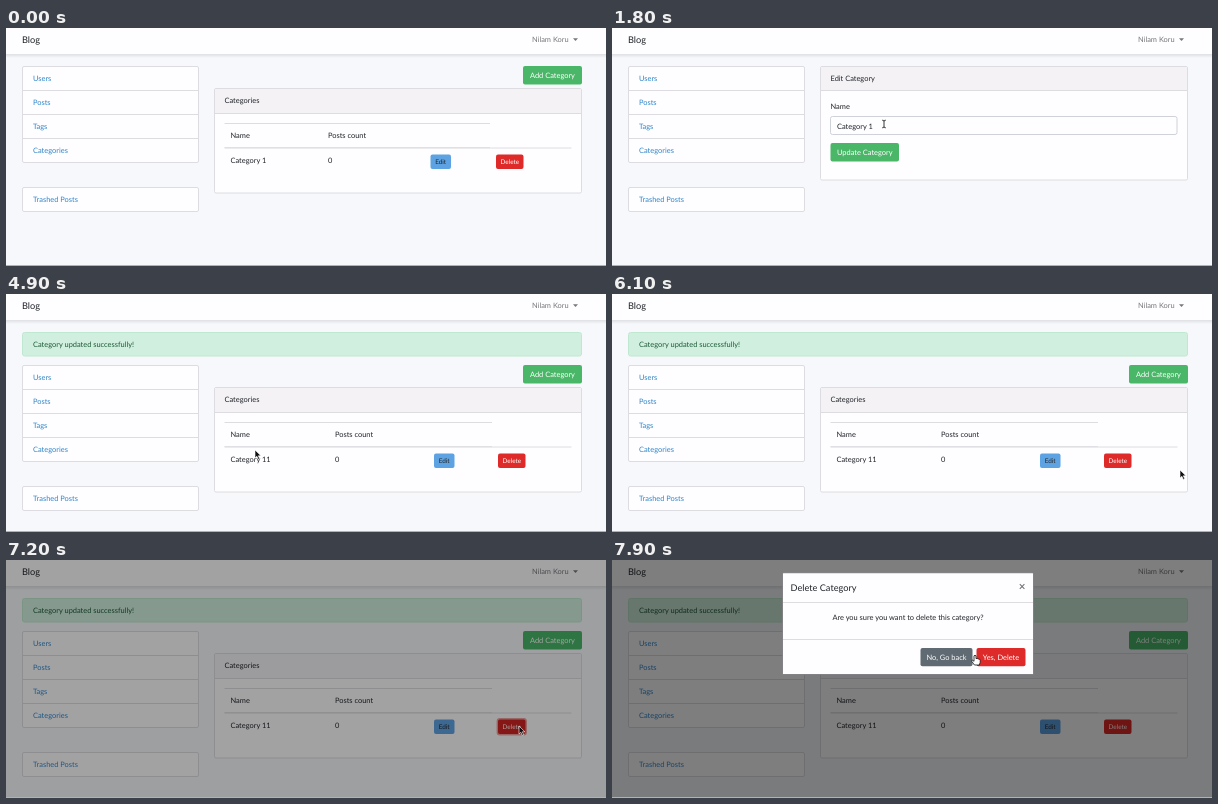
An HTML page that plays this animation: 600 by 238 pixels, repeating every 8000 ms.

```html
<!DOCTYPE html>
<html lang="en">
<head>
<meta charset="utf-8">
<title>Blog categories</title>
<style>
html, body { margin: 0; height: 100%; overflow: hidden; background: #f6f8fb; }
svg { display: block; width: 100vw; height: 100vh; font: 7.45px Lato, "Open Sans", sans-serif; text-rendering: geometricPrecision; }
text { fill: #212529; white-space: pre; }
.link { fill: #2f86c9; }
.light { fill: #fff; }
.muted { fill: #77777a; }
.title { font-size: 9.2px; }
.small { font-size: 6.4px; text-anchor: middle; }
.mid { text-anchor: middle; }
.panel { fill: #fefdff; stroke: #dddce0; }
.head { fill: #f4f2f5; }
.rule { stroke: #dddde1; }

.anim { animation: 8s step-end -8ms infinite; }
.list-before { animation-name: list-before; }
.edit-page { animation-name: edit-page; }
.list-after { animation-name: list-after; }
.side { animation-name: side; }
.edit-hover { animation-name: edit-hover; }
.focus { animation-name: focus; }
.typed { animation-name: typed; }
.caret { animation-name: caret; }
.save-hover { animation-name: save-hover; }
.delete-hover { animation-name: delete-hover; }
.backdrop { animation-name: backdrop; }
.modal { animation-name: modal; }
.pointer { animation-name: pointer; }
.arrow { animation-name: arrow; }
.hand { animation-name: hand; }
.beam { animation-name: beam; }

@keyframes list-before { 0% { opacity: 1 } 12.5%, 100% { opacity: 0 } }
@keyframes edit-page { 0% { opacity: 0 } 12.5% { opacity: 1 } 53.75%, 100% { opacity: 0 } }
@keyframes list-after { 0% { opacity: 0 } 53.75%, 100% { opacity: 1 } }
@keyframes side { 0% { transform: none } 53.75%, 100% { transform: translateY(33px) } }
@keyframes edit-hover { 0% { opacity: 0 } 6.25% { opacity: 1 } 12.5%, 100% { opacity: 0 } }
@keyframes focus { 0% { opacity: 0 } 23.75%, 100% { opacity: 1 } }
@keyframes typed { 0% { opacity: 0 } 26.25%, 100% { opacity: 1 } }
@keyframes caret { 0% { opacity: 0 } 23.75% { opacity: 1 } 32.5% { opacity: 0 } 38.75% { opacity: 1 } 45% { opacity: 0 } 51.25%, 100% { opacity: 1 } }
@keyframes save-hover { 0% { opacity: 0 } 38.75%, 100% { opacity: 1 } }
@keyframes delete-hover { 0% { opacity: 0 } 83.75% { opacity: 1 } 91.25%, 100% { opacity: 0 } }
@keyframes backdrop { 0% { opacity: 0 } 88.75% { opacity: .17 } 90% { opacity: .36 } 91.25%, 100% { opacity: .5 } }
@keyframes modal {
  0% { opacity: 0; transform: translateY(-25px) }
  91.25% { opacity: .3; transform: translateY(-16px) }
  92.5% { opacity: .7; transform: translateY(-7px) }
  93.75% { opacity: .93; transform: translateY(-2px) }
  95%, 100% { opacity: 1; transform: none }
}
@keyframes pointer {
  0% { transform: translate(452px, 260px) }
  1.25% { transform: translate(452px, 191px); animation-timing-function: steps(6) }
  8.75% { transform: translate(435px, 133px) }
  13.75% { transform: translate(435px, 133px); animation-timing-function: steps(7) }
  22.5% { transform: translate(272px, 96px) }
  33.75% { transform: translate(272px, 96px); animation-timing-function: steps(9) }
  45% { transform: translate(263px, 126px) }
  55% { transform: translate(263px, 126px); animation-timing-function: steps(5) }
  61.25% { transform: translate(249px, 156px) }
  65% { transform: translate(249px, 156px); animation-timing-function: steps(9) }
  76.25% { transform: translate(568px, 176px); animation-timing-function: steps(7) }
  85% { transform: translate(513px, 166px) }
  93.75% { transform: translate(513px, 166px); animation-timing-function: steps(4) }
  98.75%, 100% { transform: translate(363px, 95px) }
}
@keyframes arrow {
  0% { opacity: 1 } 6.25% { opacity: 0 } 12.5% { opacity: 1 } 21.25% { opacity: 0 } 36.25% { opacity: 1 }
  38.75% { opacity: 0 } 55% { opacity: 1 } 83.75% { opacity: 0 } 90% { opacity: 1 } 97.5%, 100% { opacity: 0 }
}
@keyframes hand {
  0% { opacity: 0 } 6.25% { opacity: 1 } 12.5% { opacity: 0 } 38.75% { opacity: 1 }
  55% { opacity: 0 } 83.75% { opacity: 1 } 90% { opacity: 0 } 97.5%, 100% { opacity: 1 }
}
@keyframes beam { 0% { opacity: 0 } 21.25% { opacity: 1 } 36.25%, 100% { opacity: 0 } }
</style>
</head>
<body>
<svg id="stage" viewBox="0 0 600 238" preserveAspectRatio="none"></svg>
<script>
const text = (x, y, label, cls = "") => `<text x="${x}" y="${y}" class="${cls}">${label}</text>`;
const rect = (x, y, w, h, attrs, r = 0) => `<rect x="${x}" y="${y}" width="${w}" height="${h}" rx="${r}" ${attrs}/>`;
const rule = (x1, x2, y, width = 1) => `<path class="rule" stroke-width="${width}" d="M${x1} ${y}H${x2}"/>`;
const panel = (x, y, w, h) => rect(x, y, w, h, 'class="panel"', 1.5);
const button = (x, y, w, h, color, cls = "") => rect(x, y, w, h, `fill="${color}" class="${cls}"`, 2);
const group = (cls, ...parts) => `<g class="anim ${cls}">${parts.join("")}</g>`;

const GREEN = "#4ab768", RED = "#de2a28", BLUE = "#5da2e2";

function card(y, headEnd, bottom, label) {
  return panel(208.5, y, 367, bottom - y) +
    rect(209, y + .5, 366, headEnd - y - .5, 'class="head"') +
    rule(208.5, 575.5, headEnd) + text(218.5, y + 14, label);
}

function listPage(name, countX, headEnd, editX, deleteX, hovers) {
  const edit = hovers.edit ? button(editX, 126.5, 20.5, 14.5, "#4488c6", "anim edit-hover") : "";
  const remove = hovers.remove
    ? group("delete-hover", rect(deleteX - .7, 125.8, 28.9, 15.9, 'fill="#cf2522" stroke="#eba19f" stroke-width="1.4"', 2.5))
    : "";
  return button(517, 38, 59, 18.5, GREEN) + text(524, 49.7, "Add Category", "light") +
    card(60.5, 85.5, 165, "Categories") +
    rule(218.5, headEnd, 95.5) + rule(218.5, 565.5, 120) + rule(218.5, headEnd, 119.7) +
    text(224.5, 110, "Name") + text(countX, 110, "Posts count") +
    text(224.5, 134.7, name) + text(countX, 134.7, "0") +
    button(editX, 126.5, 20.5, 14.5, BLUE) + edit + text(editX + 10.2, 136, "Edit", "small") +
    button(deleteX, 126.5, 27.5, 14.5, RED) + remove + text(deleteX + 13.8, 136, "Delete", "small light");
}

const navbar =
  rect(0, 0, 600, 30, 'fill="url(#shade)"') + rect(0, 0, 600, 26, 'fill="#fefdff"') +
  text(16, 15.2, "Blog", "title") + text(526, 14.3, "Nilam Koru", "muted") +
  '<path d="M567 10.3h5l-2.5 2.7z" fill="#77777a"/>';

const sidebar =
  panel(16.5, 38.5, 176, 96) + panel(16.5, 159.5, 176, 24) +
  [62.5, 86.5, 110.5].map(y => rule(16.5, 192.5, y)).join("") +
  ["Users", "Posts", "Tags", "Categories"].map((s, i) => text(27, 52.5 + i * 24.2, s, "link")).join("") +
  text(27, 174, "Trashed Posts", "link");

const editPage =
  card(38.5, 62.5, 152, "Edit Category") + text(218.5, 80.6, "Name") +
  rect(218.5, 88.5, 346.5, 18, 'fill="#fefdff" stroke="#cfd3d9"', 2) +
  group("focus", rect(218.2, 88.2, 347.1, 18.6, 'fill="none" stroke="#cce3f6" stroke-width="3"', 2.5),
    rect(218.5, 88.5, 346.5, 18, 'fill="none" stroke="#a1cbef"', 2)) +
  `<text x="225" y="100.5">Category 1<tspan class="anim typed">1</tspan></text>` +
  group("caret", '<path d="M266.5 93.5v8.5" stroke="#495057" stroke-width=".6"/>') +
  button(218.5, 115, 68.5, 18.5, GREEN) + button(218.5, 115, 68.5, 18.5, "#3b9956", "anim save-hover") +
  text(225, 126.8, "Update Category", "light");

const alertBox = rect(16.5, 38.5, 559, 23.5, 'fill="#d1efde" stroke="#c0e8d0"', 2) +
  '<text x="27" y="52.5" style="fill:#1d5a38">Category updated successfully!</text>';

const dialog =
  rect(170.5, 12.8, 251, 101.7, 'fill="#fefdff" stroke="#5d5b60" stroke-width=".6"', 1) +
  text(178.5, 31, "Delete Category", "title") +
  '<path d="M407.8 24.2l4.6 4.6m0-4.6l-4.6 4.6" stroke="#77757a" stroke-width="1.1"/>' +
  rule(171, 421, 42.5) + text(296, 59.6, "Are you sure you want to delete this category?", "mid") +
  rule(171, 421, 79.5) +
  button(308.5, 88, 52, 18.3, "#5f6a72") + text(334.5, 99.7, "No, Go back", "mid light") +
  button(364.5, 88, 49, 18.3, RED) + text(389, 99.7, "Yes, Delete", "mid light");

const pointer = group("pointer",
  group("arrow", '<path d="M0 0v8l1.9-1.7 1.4 3.1 1.4-.6-1.4-3h2.6z" fill="#111" stroke="#fff" stroke-width=".6"/>'),
  group("hand", '<path d="M-1 .8Q0-.4 1 .8V3.6L2.2 3.4 3.4 4 4.6 4.2 5.2 5.2V7.4L4.3 10H-.6L-3.2 6.4Q-3.4 5-2.3 5.2L-1 6.3z" fill="#fff" stroke="#111" stroke-width=".8"/>'),
  group("beam", '<path d="M-1.8-3.8Q0-3.8 0-2.8Q0-3.8 1.8-3.8M0-3V3M-1.8 3.8Q0 3.8 0 2.8Q0 3.8 1.8 3.8" fill="none" stroke="#222" stroke-width=".9"/>'));

document.getElementById("stage").innerHTML =
  `<defs><linearGradient id="shade" x2="0" y2="1">
    <stop offset=".86" stop-color="#dcdee1"/><stop offset="1" stop-color="#f6f8fb"/>
  </linearGradient></defs>` +
  rect(0, 0, 600, 238, 'fill="#f6f8fb"') + navbar +
  group("side", sidebar) +
  group("list-before", listPage("Category 1", 322, 484, 424.5, 490, { edit: true })) +
  group("edit-page", editPage) +
  group("list-after", alertBox,
    `<g transform="translate(0 33)">${listPage("Category 11", 329, 486, 428, 492, { remove: true })}</g>`) +
  rect(0, 0, 600, 238, 'class="anim backdrop"') +
  group("modal", dialog) +
  rect(0, 237, 600, 1, 'fill="#b0b2b5"') +
  pointer;
</script>
</body>
</html>
```
